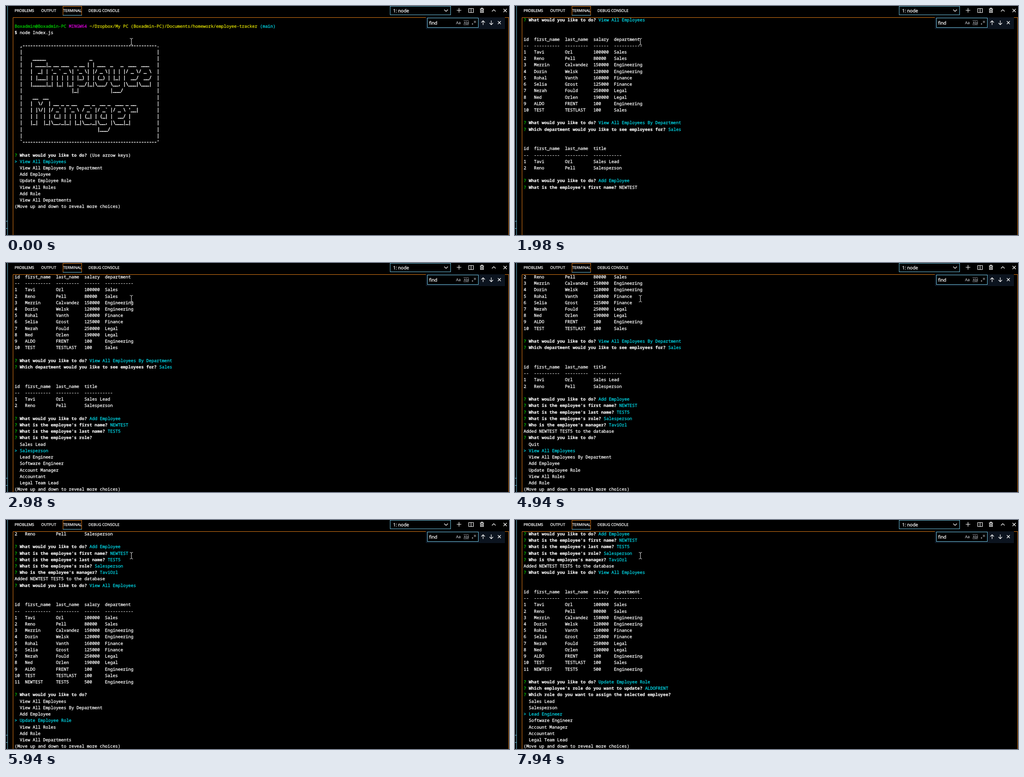
Write an HTML page that moves like this. It is 1107 px wide and 506 px high and loops after 8 s.

```html
<!DOCTYPE html>
<html lang="en">
<head>
<meta charset="utf-8">
<title>Employee manager terminal</title>
<style>
html, body { margin: 0; width: 100%; height: 100%; overflow: hidden; background: #000; }
svg { display: block; width: 1107px; height: 506px; }
text {
  color: #fff; fill: currentColor; stroke: currentColor; stroke-width: .3;
  white-space: pre; text-rendering: geometricPrecision;
}
.ui { font: 8.3px "Open Sans", "Noto Sans", sans-serif; }
.ui .big { font-size: 10px; }
.term { font: 9.475px "Noto Sans Mono", "DejaVu Sans Mono", monospace; }
.bold { font-weight: 700; stroke-width: .15; }
.art { font-size: 10.6px; letter-spacing: -.675px; stroke-width: .5; }
.green { color: #00cd00; }
.purple { color: #cd00cd; }
.yellow { color: #d8d800; }
.cyan { color: #00d7e6; }
.edge { fill: none; stroke: #6fc3df; }
.focus { fill: none; stroke: #e07b16; }
.icon { fill: none; stroke: #fff; stroke-width: 1.2; }
.dim { fill: none; stroke: #a4a8ae; stroke-width: .8; }
.ui .gray { color: #a4a8ae; font-size: 8.6px; }
</style>
</head>
<body>
<svg viewBox="0 0 1107 506">
  <clipPath id="pane"><rect x="16" y="26" width="1090" height="480"/></clipPath>
  <rect width="1107" height="506"/>
  <g id="screen" class="term" clip-path="url(#pane)"></g>

  <path class="edge" d="M3.5 0V506M0 475.5H3M0 491.5H3"/>
  <path class="focus" d="M15.5 506V25.5H1106.5V506"/>

  <g class="ui">
    <text x="19" y="13">PROBLEMS</text>
    <text x="77.5" y="13">OUTPUT</text>
    <text x="126" y="13">TERMINAL</text>
    <text x="181.5" y="13">DEBUG CONSOLE</text>
    <path class="focus" d="M125.5 21V.5H166.5V21"/>
    <path class="edge" d="M125 20.5H167"/>

    <rect class="edge" x="845.5" y=".5" width="133" height="19"/>
    <text class="big" x="852" y="13.6">1: node</text>
    <path class="icon" d="M964.5 8L968.5 12L972.5 8"/>
    <path class="icon" d="M992 9.5H1002M997 4.5V14.5"/>
    <path class="icon" d="M1018.5 5.5H1028.5V14.5H1018.5ZM1023.5 5.5V14.5"/>
    <path class="icon" d="M1043 6.5H1052M1046 6V4.7H1049V6M1044.3 7V14.4H1050.7V7M1046.5 8V13M1048.6 8V13"/>
    <path class="icon" d="M1069.5 12L1073.5 8L1077.5 12"/>
    <path class="icon" d="M1095 6.5L1102 13.5M1102 6.5L1095 13.5"/>

    <rect x="924" y="25" width="174" height="26" fill="#0c141f"/>
    <rect class="edge" x="927.5" y="26.5" width="112" height="21" style="fill:#000"/>
    <text class="big" x="931" y="41.4">find</text>
    <text class="gray" x="990.5" y="40">Aa</text>
    <text class="gray" x="1007.6" y="40" style="font-size:7.6px">Abl</text>
    <path class="dim" d="M1007 32.4H1018.5M1007 41.6H1018.5"/>
    <path class="dim" d="M1032 32V38M1029.4 33.5L1034.6 36.5M1034.6 33.5L1029.4 36.5"/>
    <rect x="1025.5" y="38.5" width="2.4" height="2.4" fill="#a4a8ae"/>
    <path class="icon" d="M1050 42V32.5M1046 36.5L1050 32.5L1054 36.5"/>
    <path class="icon" d="M1068 32V41.5M1064 37.5L1068 41.5L1072 37.5"/>
    <path class="icon" d="M1082.5 33.5L1089 40M1089 33.5L1082.5 40"/>
  </g>
  <path class="icon" d="M272.7 71.5Q275 71.5 276 73Q277 71.5 279.3 71.5M276 73V84.5M272.7 86Q275 86 276 84.5Q277 86 279.3 86" style="stroke-width:1"/>
</svg>
<script>
const LEFT = 19, COL = 5.685, BASE = 33.9, ROW = 14.22, LOOP = 8000;
const screen = document.getElementById("screen");

// A line is a list of [text, class] parts.
const plain = (text, style = "") => [[text, style]];
const blank = plain("");
const ask = (question, answer = "", style = "cyan") =>
  [["? ", "green"], [question + " ", "bold"], [answer, style]];
const HINT = "(Use arrow keys)";
const MORE = plain("(Move up and down to reveal more choices)");
const menu = (items, selected) => items.map((item, i) =>
  i === selected ? plain("> " + item, "cyan") : plain("  " + item));
const longMenu = (items, selected) => [...menu(items, selected), MORE];

// Takes seven entries of a list that wraps around.
const page = (list, start) =>
  Array.from({ length: 7 }, (_, i) => list[(start + i + list.length) % list.length]);

const WIDTHS = [2, 10, 9];
const table = (heads, lastWidths, rows) => {
  const widths = [...WIDTHS, ...lastWidths];
  const join = cells => plain(cells.map((c, i) => String(c).padEnd(widths[i])).join("  "));
  return [join(heads), join(widths.map(w => "-".repeat(w))), ...rows.map(join)];
};

const staff = [
  ["Tavi", "Orl", 100000, "Sales"],
  ["Reno", "Pell", 80000, "Sales"],
  ["Merrin", "Calvandez", 150000, "Engineering"],
  ["Dorin", "Welsk", 120000, "Engineering"],
  ["Rohal", "Vanth", 160000, "Finance"],
  ["Selia", "Grost", 125000, "Finance"],
  ["Nerah", "Fould", 250000, "Legal"],
  ["Ned", "Orlen", 190000, "Legal"],
  ["ALDO", "FRENT", 100, "Engineering"],
  ["TEST", "TESTLAST", 100, "Sales"],
  ["NEWTEST", "TEST5", 500, "Engineering"]
];
const people = staff.map(([first, last]) => first + last);
const staffTable = count => table(
  ["id", "first_name", "last_name", "salary", "department"], [6, 11],
  staff.slice(0, count).map((s, i) => [i + 1, ...s]));
const salesTable = table(
  ["id", "first_name", "last_name", "title"], [11],
  ["Sales Lead", "Salesperson"].map((title, i) => [i + 1, staff[i][0], staff[i][1], title]));

const actions = ["View All Employees", "View All Employees By Department", "Add Employee",
  "Update Employee Role", "View All Roles", "Add Role", "View All Departments", "Quit"];
const roles = ["Sales Lead", "Salesperson", "Lead Engineer", "Software Engineer",
  "Account Manager", "Accountant", "Legal Team Lead"];
const departments = ["Sales", "Engineering", "Finance", "Legal", "TEST", "NEWDEPT"];

const banner = [
  "",
  "  _____                 _",
  " | ____|_ __ ___  _ __ | | ___  _   _  ___  ___",
  " |  _| | '_ ` _ \\| '_ \\| |/ _ \\| | | |/ _ \\/ _ \\",
  " | |___| | | | | | |_) | | (_) | |_| |  __/  __/",
  " |_____|_| |_| |_| .__/|_|\\___/ \\__, |\\___|\\___|",
  "                 |_|            |___/",
  "  __  __",
  " |  \\/  | __ _ _ __   __ _  __ _  ___ _ __",
  " | |\\/| |/ _` | '_ \\ / _` |/ _` |/ _ \\ '__|",
  " | |  | | (_| | | | | (_| | (_| |  __/ |",
  " |_|  |_|\\__,_|_| |_|\\__,_|\\__, |\\___|_|",
  "                           |___/",
  ""
];
const rule = "-".repeat(52);
const logo = [
  "  ," + rule + ".",
  ...banner.map(b => "  |  " + b.padEnd(50) + "|"),
  "  `" + rule + "'"
].map(text => plain(text, "art"));

const TODO = "What would you like to do?";
const DEPT = "Which department would you like to see employees for?";
const FIRST = "What is the employee's first name?";
const ROLE = "What is the employee's role?";
const BOSS = "Who is the employee's manager?";
const WHO = "Which employee's role do you want to update?";

const log = [
  blank,
  [["Boxadmin@Boxadmin-PC ", "green"], ["MINGW64 ", "purple"],
    ["~/Dropbox/My PC (Boxadmin-PC)/Documents/homework/employee-tracker ", "yellow"],
    ["(main)", "cyan"]],
  plain("$ node Index.js"),
  blank,
  ...logo,
  blank,
  ask(TODO, actions[0]), blank, blank,
  ...staffTable(10), blank,
  ask(TODO, actions[1]),
  ask(DEPT, "Sales"), blank, blank,
  ...salesTable, blank,
  ask(TODO, actions[2]),
  ask(FIRST, "NEWTEST"),
  ask("What is the employee's last name?", "TEST5"),
  ask(ROLE, roles[1]),
  ask(BOSS, people[0]),
  plain("Added NEWTEST TEST5 to the database"),
  ask(TODO, actions[0]), blank, blank,
  ...staffTable(11), blank,
  ask(TODO, actions[3]),
  ask(WHO, people[8])
];

// Each step shows log lines from top to end, then the open prompt.
const steps = [
  { at: 0, top: 0, end: 21, prompt: [ask(TODO, HINT, ""), ...longMenu(page(actions, 0), 0)] },
  { at: 1020, top: 12, end: 38, prompt: [ask(DEPT, HINT, ""), ...menu(departments, 0)] },
  { at: 1980, top: 21, end: 47, prompt: [ask(FIRST, "NEWTEST", "")] },
  { at: 2980, top: 24, end: 49, prompt: [ask(ROLE), ...longMenu(roles, 1)] },
  { at: 3960, top: 25, end: 50, prompt: [ask(BOSS, HINT, ""), ...longMenu(page(people, 0), 0)] },
  { at: 4940, top: 27, end: 52, prompt: [ask(TODO), ...longMenu(page(actions, -1), 1)] },
  { at: 5940, top: 44, end: 69, prompt: [ask(TODO), ...longMenu(page(actions, 0), 3)] },
  { at: 6940, top: 45, end: 70, prompt: [ask(WHO), ...longMenu(page(people, 5), 3)] },
  { at: 7940, top: 46, end: 71, prompt: [
    ask("Which role do you want to assign the selected employee?"), ...longMenu(roles, 2)] }
];

function drawLine(parts, row) {
  let col = 0;
  for (const [text, style] of parts) {
    if (text.trim()) {
      const node = document.createElementNS("http://www.w3.org/2000/svg", "text");
      node.setAttribute("x", LEFT + col * COL);
      node.setAttribute("y", BASE + row * ROW);
      node.setAttribute("class", style);
      node.textContent = text;
      screen.append(node);
    }
    col += text.length;
  }
}

let shown;
function render(time) {
  const step = steps.findLast(s => s.at <= time);
  if (step === shown) return;
  shown = step;
  screen.replaceChildren();
  [...log.slice(step.top, step.end), ...step.prompt].forEach(drawLine);
}

const start = performance.now();
function tick() {
  render((performance.now() - start) % LOOP);
  requestAnimationFrame(tick);
}
tick();
</script>
</body>
</html>
```
